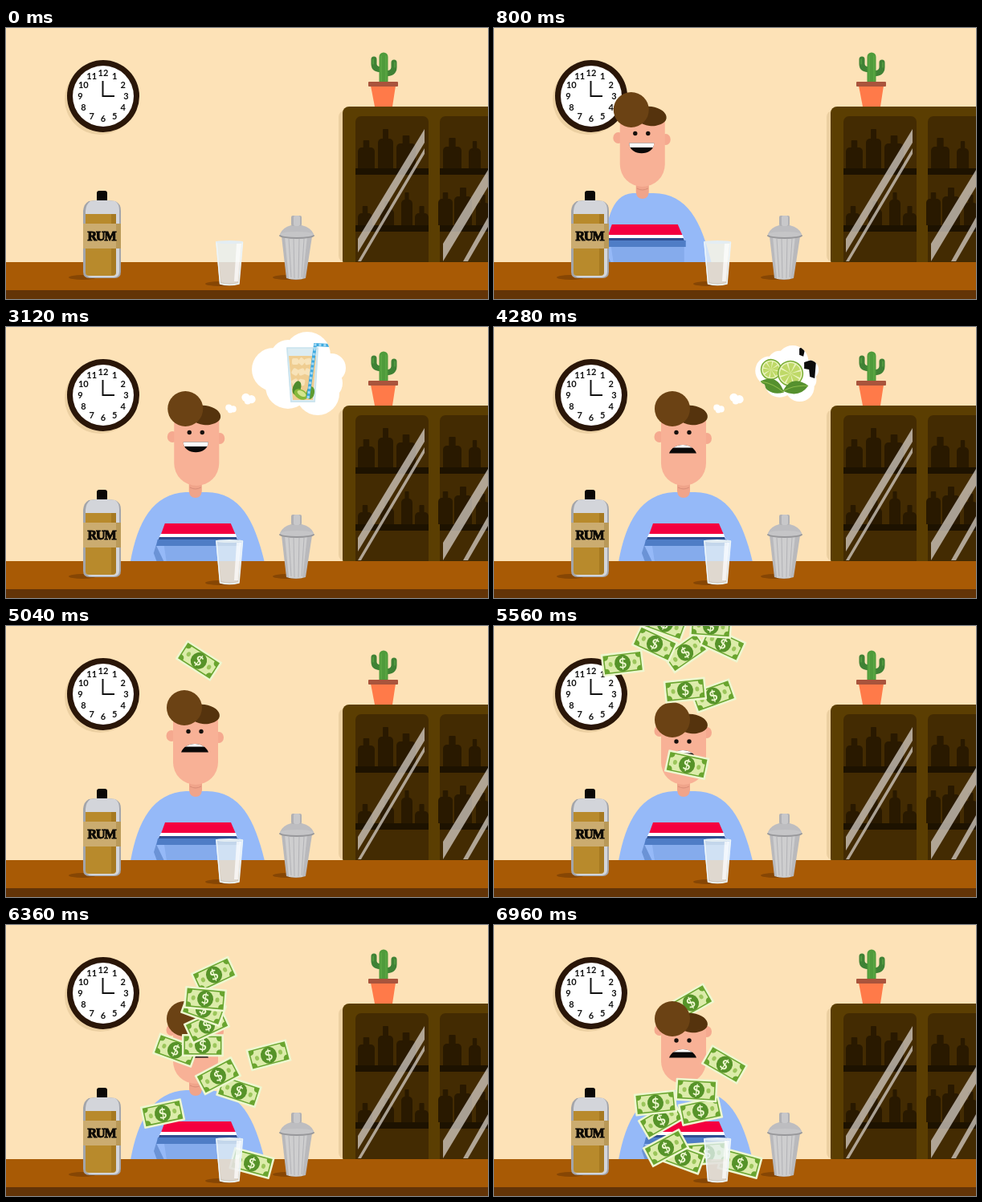
These frames come from a looping animation (600x338 px, 7000 ms). An HTML page with a canvas:

```html
<!DOCTYPE html>
<html lang="en">
<head>
<meta charset="utf-8">
<title>Bar</title>
<style>
html, body { margin: 0; width: 100%; height: 100%; overflow: hidden; background: #fde2b7; }
canvas { display: block; }
</style>
</head>
<body>
<canvas id="stage" width="600" height="338"></canvas>
<script>
const c = document.getElementById('stage').getContext('2d');
const LOOP = 7000;
const clamp = k => Math.max(0, Math.min(1, k));
const span = (t, a, b) => clamp((t - a) / (b - a));
const smooth = k => k * k * (3 - 2 * k);
const mix = (a, b, k) => a + (b - a) * k;

function fill(color, path) {
  c.fillStyle = color;
  c.fill(typeof path === 'string' ? new Path2D(path) : path);
}
function line(color, width, path) {
  c.strokeStyle = color;
  c.lineWidth = width;
  c.stroke(new Path2D(path));
}
function oval(color, x, y, rx, ry = rx, turn = 0) {
  c.fillStyle = color;
  c.beginPath();
  c.ellipse(x, y, rx, ry, turn, 0, Math.PI * 2);
  c.fill();
}
function box(color, x, y, w, h, r = 0) {
  c.fillStyle = color;
  c.beginPath();
  c.roundRect(x, y, w, h, r);
  c.fill();
}
function at(x, y, turn, scale, draw) {
  c.save();
  c.translate(x, y);
  c.rotate(turn);
  c.scale(scale, scale);
  draw();
  c.restore();
}

function clock() {
  oval('#ecd0a2', 117, 89, 44);
  oval('#2a1608', 121, 85, 45);
  oval('#fff', 121, 85, 38);
  c.fillStyle = '#111';
  c.font = '700 11px Lato, sans-serif';
  c.textAlign = 'center';
  c.textBaseline = 'middle';
  for (let h = 1; h <= 12; h++) {
    const a = h * Math.PI / 6;
    c.fillText(h, 121 + 28.5 * Math.sin(a), 85.5 - 28.5 * Math.cos(a));
  }
  line('#111', 2, 'M120.5 66V85H135');
}

// Left edge, width, top of neck, top of body, shelf
const silhouettes = [
  [438, 21, 140, 149, 175], [463, 19, 126, 138, 175], [486, 24, 134, 144, 175],
  [544, 23, 137, 148, 175], [576, 15, 141, 150, 175], [438, 18, 222, 231, 246],
  [466, 17, 216, 226, 246], [492, 14, 205, 214, 246], [509, 17, 222, 231, 246],
  [538, 18, 205, 213, 246], [558, 22, 199, 210, 246], [585, 17, 208, 218, 246]
];

function cabinet() {
  box('#ecd0a2', 414, 103, 190, 189, 8);
  box('#5b3e02', 419, 98, 190, 200, 8);
  for (const [x, w] of [[435, 91], [540, 70]]) {
    box('#432b02', x, 110, w, 182, [7, 7, 0, 0]);
    box('#50370a', x, 183, w, 63);
    box('#432b02', x, 183, w, 109);
  }
  for (const [x, w, neck, top, base] of silhouettes) {
    box('#291900', x, top, w, base - top, [5, 5, 0, 0]);
    box('#291900', x + w * .32, neck, w * .36, top - neck + 3, 1);
  }
  for (const y of [175, 246]) {
    box('#1d1200', 435, y, 91, 8);
    box('#1d1200', 540, y, 60, 8);
  }
  fill('rgba(220,213,205,.72)',
    'M521 126V143L438 280V263Z M521 150V157L442 291H438Z' +
    'M600 177V198L544 291V269Z M600 236V248L575 291H569Z');
}

function cactus() {
  c.lineCap = 'round';
  line('#3f8235', 7, 'M458 39V45Q458 52 469 52M483 43V49Q483 57 471 57');
  line('#4f9b3b', 11, 'M470 36V68');
  line('#62ad48', 1, 'M467 35V66M473 35V66M457 39V45M484 43V49');
  c.lineCap = 'butt';
  fill('#ff7a49', 'M454 72H485L481 98H459Z');
  box('#a9543c', 451, 67, 37, 6, 1);
}

function counter() {
  box('#a85a05', 0, 292, 600, 36);
  box('#633407', 0, 327, 600, 11);
  oval('#864604', 95, 311, 17, 3);
  oval('#864604', 266, 319, 18, 3);
  oval('#864604', 349, 311, 17, 3);
}

function rum() {
  box('#0a0806', 113, 203, 13, 15, 3);
  fill('#a3a5aa', 'M112 215H127L136 216Q143 219 143 228V304Q143 312 135 312H104Q96 312 96 304V228Q97 219 103 216Z');
  fill('#d3d5da', 'M112 215H127L136 216Q141 219 141 228V304Q141 311 134 311H107Q99 311 99 304V228Q100 219 105 216Z');
  box('#b88a2c', 99, 232, 38, 77, [0, 0, 4, 4]);
  box('#a67921', 131, 232, 6, 76, [0, 0, 4, 0]);
  box('#cbac70', 96, 244, 47, 31);
  box('#b99958', 137, 244, 6, 31);
  c.font = '700 16px "Liberation Serif", serif';
  c.textAlign = 'center';
  c.textBaseline = 'alphabetic';
  c.letterSpacing = '-1px';
  c.fillStyle = '#0d0a06';
  c.fillText('RUM', 119, 265);
  c.strokeStyle = '#0d0a06';
  c.lineWidth = 1;
  c.strokeText('RUM', 119, 265);
  c.letterSpacing = '0px';
}

function glass() {
  fill('rgba(232,242,248,.76)', 'M261 266H295L290 319Q278 323 266 319Z');
  fill('rgba(226,220,213,.72)', 'M265 292H291L288 317Q278 320 268 317Z');
  fill('rgba(255,255,255,.7)', 'M287 269H293L289 316H284Z');
  line('#edf6fb', 1.5, 'M262 267L266.500 319Q278 322 290 319L294.500 267');
  oval('#e3edf3', 278, 267, 17, 2);
}

function shaker() {
  fill('#b9b9bc', 'M343 260H381L373 312Q361 316 349 312Z');
  fill('#cececf', 'M347 260H375L369 313H352Z');
  line('#b3b3b7', 1, 'M352 263L355 311M358 263L359 312M365 263L364 312M371 263L368 311');
  fill('#bdbdc0', 'M341 257Q344 249 355 246H368Q380 249 383 257Z');
  oval('#98989b', 362, 259, 22, 4);
  oval('#c5c5c7', 362, 257.5, 21, 3.500);
  box('#b1b1b4', 355, 234, 13, 13, 2);
  box('#c8c8ca', 358, 234, 8, 13, 2);
}

function mouth(x, y, sad) {
  const corner = mix(143.5, 157.5, sad) + y, half = mix(15.5, 17, sad);
  const up = 14 * sad, down = 17 * (1 - sad);
  c.save();
  c.clip(new Path2D(`M${x - half} ${corner}C${x - half * .7} ${corner - up} ${x + half * .7} ${corner - up} ${x + half} ${corner}` +
    `C${x + half} ${corner + down} ${x - half} ${corner + down} ${x - half} ${corner}Z`));
  box('#0b0808', x - 20, 140 + y, 40, 30);
  box('#fff', x - 20, 135 + y, 40, mix(14, 15.5, sad));
  c.restore();
}

function man(t) {
  const left = mix(183, 155, smooth(span(t, 1700, 2250)));
  const nod = smooth(span(t, 5050, 5250));
  const sad = smooth(span(t, 3750, 3950));
  const sway = 1.5 * smooth(span(t, 1800, 2200)) * (1 - smooth(span(t, 3600, 4000)));
  c.save();
  c.translate(-330 * Math.exp(-t / 430), 0);

  fill('#95b9f8', `M${left} 293C${left + 9} 243 ${mix(183, 195, (left - 155) / 28)} 208 224 206H250C292 207 309 240 322 293Z`);
  fill('#6b93d6', 'M187 272L197 293H188L184 282Z');
  fill('#f4003f', 'M198 245H280L286 259H193Z');
  fill('#fff', 'M193 258H286L288 264H190Z');
  fill('#2f4f91', 'M191 262H287L288 265H190Z');
  fill('#4f7dc6', 'M189 265H290V273H187Z');
  fill('#85abec', 'M197 273H288V293H200Z');

  fill('#f0a48a', 'M228 190H244V205Q243 213 236 213Q229 213 228 205Z');
  line('#d98e78', 1, 'M229 200Q236 204 243 200');
  c.translate(sway, 0);
  oval('#f5a98f', 206, 137 - 6 * nod, 6.500, 7);
  oval('#f5a98f', 265, 139 - 6 * nod, 6, 7);
  box('#f8b196', 208, 106 + 10 * nod, 56, 92 - 10 * nod, [10, 10, 28, 28]);
  const hairY = 15 * nod;
  oval('#55330d', 246, 110 + hairY * .8, 20, 12, .12);
  oval('#6b4214', 222, 102 + hairY, 22);
  oval('#17100d', 227, 131.500 + 12.500 * nod, 2.700);
  oval('#17100d', 243, 131.500 + 12.500 * nod, 2.700);
  mouth(235, 8 * nod, sad);
  c.restore();
}

function puff(x, y, size) {
  if (size <= 0) return;
  at(x, y, 0, size, () => {
    oval('#fff', -3, -1, 4.500);
    oval('#fff', 3, 1, 4.500);
    oval('#fff', -1, 3, 3.500);
  });
}

function drink() {
  fill('#dcecf2', 'M-16 -32H24L20 36H-11Z');
  fill('#efcd91', 'M-13 -22H21L17 33H-8Z');
  for (let i = 0; i < 8; i++)
    at(-5 + i % 3 * 8, -15 + Math.floor(i / 3) * 13, i * .7, 1, () => box('#f8e3b9', -4, -4, 8, 8, 2));
  oval('#4e8b2c', -3, 18, 5, 9, .3);
  oval('#86b83b', 2, 26, 9, 6, .5);
  oval('#d4e58c', 3, 25, 6, 3, .5);
  oval('#5d9b30', 14, 24, 5, 8, .2);
  line('#3fa9df', 4, 'M11 31L20 -36L39 -35');
  c.setLineDash([3, 3]);
  line('#a2daf4', 3, 'M11 31L20 -36L39 -35');
  c.setLineDash([]);
  line('#c9e3ee', 1.500, 'M-15 -32L-10 35H19L23 -32Z');
}

function slice(x, y, r, turn) {
  at(x, y, turn, 1, () => {
    oval('#79ad35', 0, 0, r);
    oval('#eaf3bd', 0, 0, r - 1.500);
    for (let i = 0; i < 8; i++) {
      c.fillStyle = '#bfd968';
      c.beginPath();
      c.moveTo(0, 0);
      c.arc(0, 0, r - 3, i * Math.PI / 4 + .08, (i + 1) * Math.PI / 4 - .08);
      c.fill();
    }
  });
}

function limes(t) {
  slice(-20, -5, 13, .2);
  slice(4, 0, 16, .5);
  for (const [x, y, turn] of [[-18, 15, .35], [10, 17, -.3]])
    at(x, y, turn, 1, () => {
      fill('#55902e', 'M-16 0Q0 -17 16 3Q0 15 -16 0Z');
      line('#8cbb4b', 1, 'M-15 0Q0 -3 15 3');
    });
  if (t > 4120) fill('#0c0c0c', 'M15 -31L23 -35L20 -21L15 -23Z M21 -14L36 -19L34 6L28 4L27 -5L21 -6Z');
}

const lobes = [[10, -23, 29], [-32, -5, 27], [40, -7, 18], [23, 25, 27], [-14, 16, 28], [34, 12, 20], [-14, -20, 22]];

function thought(t) {
  const leave = 1 - span(t, 4100, 4450) ** 1.7;
  const grow = 1 - (1 - span(t, 1570, 2220)) ** 2;
  const away = 1 - smooth(span(t, 4400, 4650));
  puff(280, 101.500, smooth(span(t, 1500, 1700)) * .9 * away);
  puff(302, 89, smooth(span(t, 1720, 1950)) * 1.15 * away);
  const size = grow * leave;
  if (size <= 0) return;
  at(365, 58, 0, size, () => {
    const shape = new Path2D();
    for (const [x, y, r] of lobes) {
      shape.moveTo(x + r, y);
      shape.arc(x, y, r, 0, Math.PI * 2);
    }
    c.globalAlpha = span(t, 1650, 1930);
    fill('#fff', shape);
    c.globalAlpha = 1;
    c.clip(shape);
    const first = t < 3500;
    const pop = smooth(first ? span(t, 2000, 2300) * (1 - span(t, 3380, 3500)) : span(t, 3500, 3720));
    if (pop > 0) at(0, 0, 0, first ? pop : pop / .67, () => first ? drink() : limes(t));
  });
}

function bill() {
  box('#eef7d0', -26, -14, 52, 28, 1);
  box('#69a52f', -23.500, -11.500, 47, 23);
  fill('#dcecaa', 'M-17 -10H17Q17 -5 22 -5V5Q17 5 17 10H-17Q-17 5 -22 5V-5Q-17 -5 -17 -10Z');
  oval('#9cc65b', -15, 0, 2.500, 3);
  oval('#9cc65b', 15, 0, 2.500, 3);
  oval('#569329', 0, 0, 10, 10.500);
  c.fillStyle = '#eef7d0';
  c.font = '700 17px Lato, sans-serif';
  c.textAlign = 'center';
  c.textBaseline = 'middle';
  c.fillText('$', 0, 1);
}

// Three poses per note: x, y, degrees
const notes = [
  [265, -95, -40, 259, 62, -25, 245, 97, -30],
  [240, 173, 12, 306, 297, 15, 306, 297, 15],
  [238, 33, -35, 290, 207, 18, 265, 285, -4],
  [273, 87, -20, 264, 188, -28, 235, 290, 20],
  [160, 46, -7, 195, 235, -12, 214, 278, -28],
  [238, 80, -6, 211, 156, 20, 208, 243, -30],
  [285, 22, 25, 327, 162, -15, 345, 380, 10],
  [200, 22, 25, 245, 150, 0, 201, 222, -6],
  [213, -3, 20, 250, 125, -25, 257, 232, -12],
  [270, 0, 4, 246, 105, 20, 252, 206, 3],
  [240, -60, -10, 248, 92, 5, 287, 174, 30]
];

function fall(note, t) {
  if (t < 4500) return;
  const early = Math.max(0, 5560 - t);
  const k = t < 6360 ? span(t, 5560, 6360) : span(t, 6360, 6960);
  const i = t < 6360 ? 0 : 3;
  const [x, y, turn] = [0, 1, 2].map(j => mix(note[i + j], note[i + j + 3], k));
  const settled = note[i + 1] === note[i + 4];
  const flutter = settled ? 0 : 10 * Math.sin(k * Math.PI * 2);
  at(x, y - early * .25, (turn + flutter + early * .04) * Math.PI / 180, 1, bill);
}

function draw(t) {
  box('#fde2b7', 0, 0, 600, 338);
  clock();
  cabinet();
  cactus();
  fall(notes[0], t);
  man(t);
  counter();
  thought(t);
  rum();
  shaker();
  notes.slice(1).forEach(note => fall(note, t));
  glass();
}

const start = performance.now();
function tick() {
  draw((performance.now() - start) % LOOP);
  requestAnimationFrame(tick);
}
tick();
</script>
</body>
</html>
```
